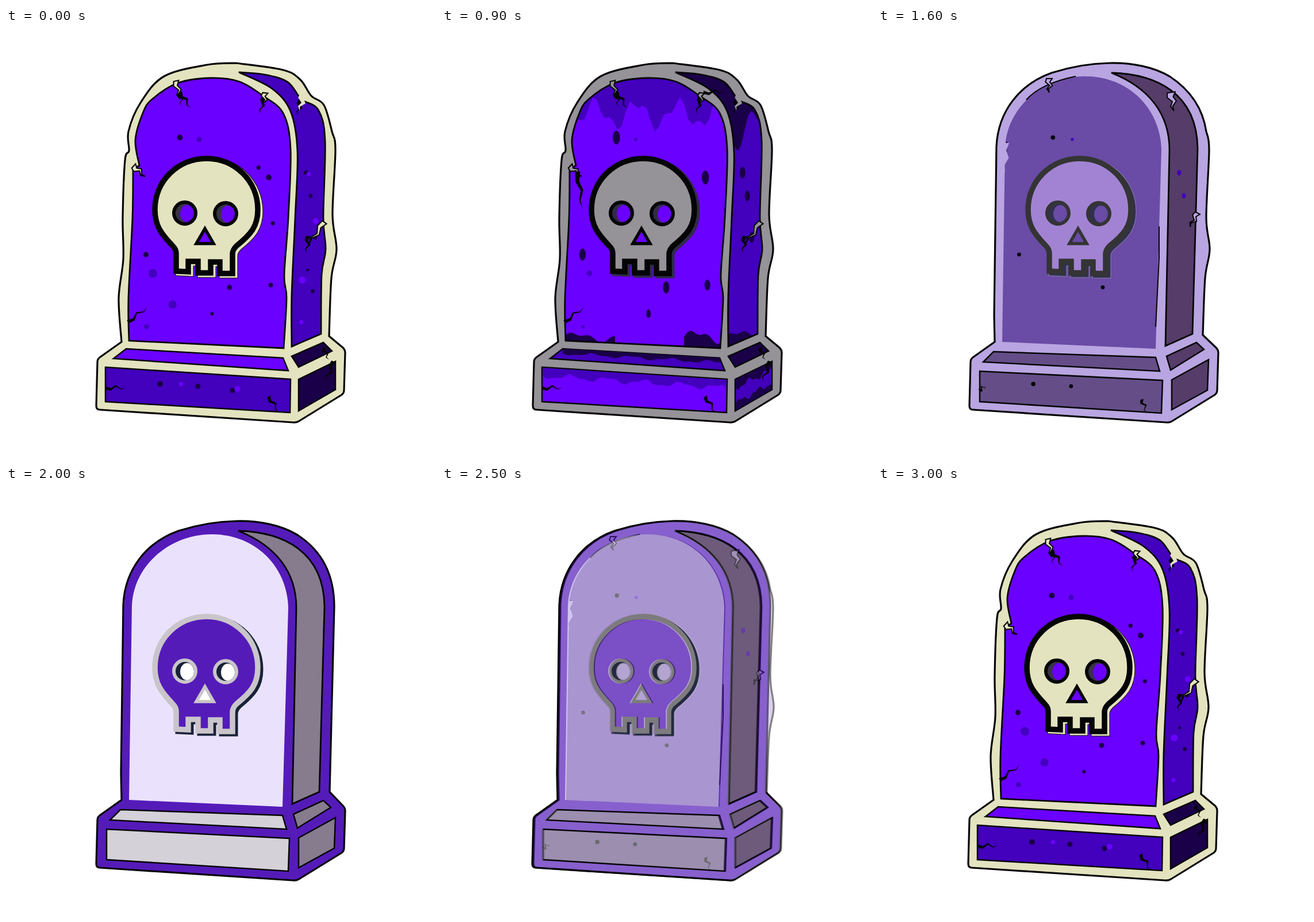
Animation, 748 px wide and 748 px high, one loop 3.4 s. Source, as an HTML page:

```html
<!DOCTYPE html>
<html lang="en">
<head>
<meta charset="utf-8">
<title>Tombstone</title>
<style>
  html, body { margin: 0; width: 100%; height: 100%; overflow: hidden; background: #fff; }
  svg { display: block; width: 100vw; height: 100vh; }
</style>
</head>
<body>
<svg id="stage" viewBox="0 0 748 748"></svg>
<script>
const INK = '#050505', NIGHT = '#1a0048', DEEP = '#4300bd', VIVID = '#6a00ff';

const path = (d, fill, stroke = 'none', width = 3) =>
  `<path d="${d}" fill="${fill}" stroke="${stroke}" stroke-width="${width}"/>`;
const poly = (points, fill, stroke, width) => path(`M${points.join('L')}Z`, fill, stroke, width);

// Catmull-Rom spline through "x,y x,y ...", continuing a path.
function curve(text) {
  const p = text.split(' ').map(s => s.split(',').map(Number));
  let d = 'L' + p[0];
  for (let i = 0; i < p.length - 1; i++) {
    const a = p[i - 1] || p[i], b = p[i], c = p[i + 1], e = p[i + 2] || c;
    const ctrl = (q, r, o, k) => [0, 1].map(n => (o[n] + k * (r[n] - q[n]) / 6).toFixed(1));
    d += `C${ctrl(a, c, b, 1)} ${ctrl(b, e, c, -1)} ${c}`;
  }
  return d;
}

// Zigzag that tapers from one point to another.
function crack(x0, y0, x1, y1, width = 6, fill = INK, edge = 'none') {
  const length = Math.hypot(x1 - x0, y1 - y0), nx = (y0 - y1) / length, ny = (x1 - x0) / length;
  const side = sign => [0, 1, 2, 3, 4].map(i => {
    const k = i / 4, bend = i % 4 ? (i % 2 ? 3 : -3) : 0, off = bend + sign * width / 2 * (1 - k);
    return [x0 + (x1 - x0) * k + nx * off, y0 + (y1 - y0) * k + ny * off];
  });
  return poly([...side(1), ...side(-1).reverse()], fill, edge, 2);
}

function scatter(fill, count, [x, y, w, h], size, stretch = 1, seed = 7) {
  const random = () => (seed = seed * 16807 % 2147483647) / 2147483647;
  random();
  return Array.from({ length: count }, () => {
    const r = size * (0.7 + 0.6 * random());
    return `<ellipse cx="${x + w * random()}" cy="${y + h * random()}" rx="${r}" ry="${r * stretch}" fill="${fill}"/>`;
  }).join('');
}

// Strip hanging from a line, with a wavy free edge.
function ragged(fill, x0, y0, x1, y1, depth, waves = 4) {
  const wavy = Array.from({ length: 41 }, (_, i) => {
    const k = 1 - i / 40, wave = 0.3 * Math.sin(k * waves * 6.28) + 0.15 * Math.sin(k * waves * 15);
    return [x0 + (x1 - x0) * k, y0 + (y1 - y0) * k + depth * (1 + wave)];
  });
  return poly([[x0, y0], [x1, y1], ...wavy], fill);
}

const SMOOTH = {
  left: 'L200,500 L204,206 C207,145 244,98 300,78 Q350,62 400,61',
  right: 'C440,60 478,68 505,84 Q571,125 571,210 L563,532',
  front: 'M214,546 L219,208 C222,138 285,84 358,84 C432,84 489,138 491,212 L481,558 Z',
  side: 'M404,78 C480,80 553,112 554,210 L545,532 L498,553 L505,212 C505,150 470,104 404,78 Z',
  base: ['199,563 481,573 488,597 181,581', '500,571 552,547 565,559 507,595', '175,597 493,613 491,670 175,650', '509,612 573,577 571,630 509,664']
};
const WORN = {
  left: curve('201,546 196,470 204,402 203,330 207,230 214,213 213,180 234,130 275,84 350,64 400,61'),
  right: curve('400,61 482,73 512,90 531,118 553,134 567,180 573,212 568,325 575,385 566,435 562,536'),
  front: 'M214,544' + curve('214,544 213,470 220,330 221,246') + 'L232,239' +
    curve('232,239 225,195 238,148 254,124 298,96 355,87 405,93 447,118 482,148 495,210 491,330 484,430 488,470 483,557') + 'Z',
  side: 'M405,77' + curve('405,77 450,81 490,94 514,124 543,142 555,195 552,330 556,385 549,430 548,532') + 'L497,554' +
    curve('497,554 497,465 503,330 507,215 495,145 462,105 405,77') + 'Z',
  base: ['209,558 482,574 491,596 187,575', '497,571 552,547 567,562 509,590', '173,590 495,611 494,669 173,650', '509,611 573,580 573,629 509,666']
};
const SKULL = 'M296,423 V392 Q296,385 290,379 C270,358 259,344 259,316 C259,266 299,227 349,227 C398,227 438,266 438,316 C438,345 426,359 401,379 Q394,386 394,393 V427 L372,427 V407 H356 V426 H334 V406 H317 V424 Z';
const FACE = [230, 100, 250, 430], FLANK = [512, 180, 34, 340], PLINTH = [190, 612, 270, 34];

const outline = (left, right) =>
  `M163,664 Q157,664 157,657 L159,581 Q159,576 163,573 L201,546 ${left} ${right} L586,556 Q590,560 590,565 L588,630 Q588,635 584,638 L511,683 Q505,687 499,686 Z`;

const wounds = band =>
  crack(303, 112, 322, 139, 8) + crack(303, 112, 306, 136, 5) + crack(449, 118, 443, 150, 7) +
  crack(513, 125, 508, 152, 9) + crack(526, 362, 523, 392, 8) +
  crack(296, 92, 303, 124, 9, band, INK) + crack(451, 113, 448, 136, 9, band, INK) +
  crack(518, 116, 511, 144, 14, band) + crack(554, 338, 527, 376, 9, band, INK) +
  crack(222, 240, 242, 258, 10, band, INK) +
  crack(212, 511, 246, 485) + crack(173, 626, 209, 625) + crack(457, 641, 476, 669, 7) +
  crack(553, 556, 562, 577, 7) + crack(570, 580, 557, 615, 8);

const aged = {
  ...WORN, band: '#e4e3bf', fill: [VIVID, DEEP, VIVID, NIGHT, DEEP, NIGHT], dx: 0, edge: INK,
  ring: INK, shade: '#e4e3bf', shadeEdge: INK, socket: '#383347',
  marks: band =>
    scatter(NIGHT, 14, FACE, 4) + scatter(DEEP, 6, FACE, 6, 1, 31) +
    scatter(NIGHT, 5, FLANK, 3) + scatter(VIVID, 4, FLANK, 5, 1, 31) +
    scatter(NIGHT, 3, PLINTH, 4) + scatter(VIVID, 2, PLINTH, 5, 1, 31) + wounds(band)
};

const decayed = {
  ...aged, band: '#959298', fill: [VIVID, DEEP, DEEP, NIGHT, VIVID, DEEP], dx: 1,
  shade: '#302b48', shadeEdge: '#302b48', socket: '#302b48',
  frontWear: ragged(DEEP, 210, 80, 500, 80, 70) + ragged(NIGHT, 420, 565, 500, 565, -28, 1) + ragged(NIGHT, 210, 560, 300, 560, -22, 1),
  sideWear: ragged(NIGHT, 400, 60, 570, 80, 100, 2) + ragged(NIGHT, 490, 565, 560, 540, -22, 1),
  marks: band =>
    ragged(NIGHT, 209, 558, 482, 574, 8) +
    ragged(DEEP, 174, 591, 494, 612, 14, 5) + ragged(NIGHT, 510, 612, 572, 581, 14, 2) + ragged(NIGHT, 510, 665, 572, 629, -12, 2) +
    scatter(NIGHT, 10, FACE, 5, 1.9) + scatter(DEEP, 5, FACE, 4, 1, 31) + scatter(NIGHT, 3, FLANK, 4, 2) +
    wounds(band) + crack(235, 250, 244, 316, 9) + crack(454, 112, 492, 110)
};

const young = {
  ...SMOOTH, right: 'C440,60 478,68 505,84 Q560,120 569,180' + curve('569,180 574,212 569,330 575,385 567,435 563,534'),
  band: '#b9a5e1', fill: ['#6a4ba5', '#563c69', '#654e88', '#563c69', '#654e88', '#563c69'], dx: 2, edge: 'none',
  ring: '#343434', skull: '#a283d3', shade: '#30314f', shadeEdge: '#8f83a5', socket: '#30314f',
  marks: band =>
    scatter(INK, 6, FACE, 3) + scatter(DEEP, 2, FACE, 3.5, 1, 31) + scatter(DEEP, 2, FLANK, 3, 1.3) + scatter(INK, 2, PLINTH, 3) +
    path('M256,125 Q280,97 342,84 M222,198 L221,221 M487,345 V400 L481,520', 'none', INK, 2) +
    crack(296, 88, 296, 112, 10, band, INK) + crack(219, 200, 219, 252, 14, band) +
    crack(508, 112, 513, 144, 14, band, INK) + crack(554, 322, 541, 346, 9, band, INK) +
    crack(174, 630, 185, 622) + crack(457, 646, 466, 669)
};

const fresh = {
  ...SMOOTH, band: '#551bb9', fill: ['#eae2fc', '#877b8e', '#d5d1d8', '#877b8e', '#d5d1d8', '#877b8e'], dx: 0, edge: 'none',
  ring: '#c9c5ca', shade: '#182238', shadeEdge: '#182238', socket: '#182238', hole: '#fff', marks: () => ''
};
const pristine = { ...fresh, band: '#4f14b4', fill: ['#f1ebfe', ...fresh.fill.slice(1)] };
const ruined = { ...decayed, band: '#89868d' };

function drawSkull(s) {
  const hole = s.hole || s.fill[0];
  const eye = (x, y) =>
    `<circle cx="${x}" cy="${y}" r="18" fill="${s.socket}"/>` +
    `<ellipse cx="${x + 4}" cy="${y + 1}" rx="12" ry="15" fill="${hole}"/>` +
    `<circle cx="${x}" cy="${y}" r="19" fill="none" stroke="${s.ring}" stroke-width="6"/>`;
  return `<g transform="translate(4 3)">${path(SKULL, 'none', s.shadeEdge, 11)}${path(SKULL, 'none', s.shade, 9)}</g>` +
    path(SKULL, s.skull || s.band, s.ring, 9.5) + eye(311, 322) + eye(382, 323) +
    path('M346,349 L331,375 H361 Z', hole, s.ring, 5.5);
}

function drawStone(s, i) {
  const clip = name => `<clipPath id="${name}${i}"><path d="${s[name]}"/></clipPath>`;
  const face = (name, fill, wear = '', edge) =>
    clip(name) + path(s[name], fill) + `<g clip-path="url(#${name}${i})">${wear}</g>` + path(s[name], 'none', edge, 2.8);
  return `<g transform="translate(${s.dx} 0)">` +
    path(outline(s.left, s.right), s.band, INK, 3.2) +
    face('front', s.fill[0], s.frontWear, s.edge) + face('side', s.fill[1], s.sideWear, INK) +
    s.base.map((points, n) => poly(points.split(' '), s.fill[n + 2], INK, 2.5)).join('') +
    s.marks(s.band) + drawSkull(s) + '</g>';
}

const looks = [[0, pristine], [1, fresh], [5, young], [8, aged], [12, decayed], [13, ruined]];
const stage = document.getElementById('stage');
stage.innerHTML = looks.map(([, look], i) => `<g class="look">${drawStone(look, i)}</g>`).join('');
const layers = [...stage.querySelectorAll('.look')];

// The stone ages, is restored and ages again; one pose per step.
const STEP = 100, STEPS = 34;
const keys = [[0, 8], [6, 13], [8, 13], [21, 0], [22, 0], [30, 8], [STEPS, 8]];

function ageAt(step) {
  const i = keys.findIndex(([end]) => end > step);
  const [from, a] = keys[i - 1], [to, b] = keys[i];
  return a + (b - a) * (step - from) / (to - from);
}

function show(age) {
  layers.forEach((layer, i) => {
    const from = i ? looks[i - 1][0] : -1, own = looks[i][0], next = looks[i + 1]?.[0] ?? Infinity;
    const opacity = Math.min(1, Math.max(0, (age - from) / (own - from)));
    layer.style.opacity = opacity;
    layer.style.display = opacity > 0 && age < next ? '' : 'none';
  });
}

function tick() {
  show(ageAt(Math.floor(performance.now() / STEP) % STEPS));
  requestAnimationFrame(tick);
}
tick();
</script>
</body>
</html>
```
